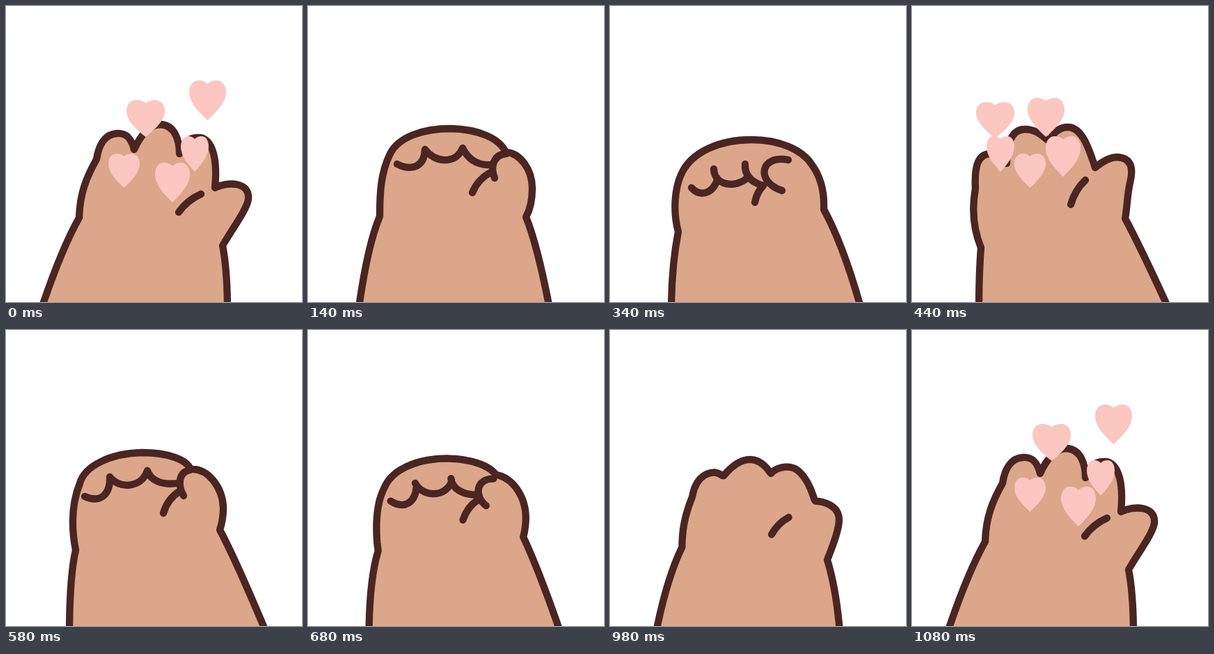
These frames come from a looping animation (425x425 px, 1180 ms). An HTML page:

```html
<!DOCTYPE html>
<html lang="en">
<head>
<meta charset="utf-8">
<title>Waving paw</title>
<style>
  html, body { margin: 0; width: 100%; height: 100%; overflow: hidden; background: #fff; }
  svg { display: block; width: 100vw; height: 100vh; }
  .ink { stroke: #4a2522; stroke-width: 10.3; stroke-linecap: round; stroke-linejoin: round; }
</style>
</head>
<body>
<svg viewBox="0 0 425 425">
  <path id="paw" class="ink" fill="#dca68a"/>
  <path id="marks" class="ink" fill="none"/>
  <g id="hearts" fill="#fcc6c1"></g>
</svg>
<script>
const LOOP = 1180;
const SVG = 'http://www.w3.org/2000/svg';
const SAMPLES = 120;
const HEART = 'M50 8C44 3 36 0 26 0C9 0 0 13 0 30C0 55 26 80 50 100' +
              'C74 80 100 55 100 30C100 13 91 0 74 0C64 0 56 3 50 8Z';

// left: foot x, control point; hand: wrist to wrist; right: control point, foot x.
// The crease is always the last of the marks.
const openRight = {
  left: [49, 79, 350],
  hand: '105 304C106 268 116 245 130 220C133 200 142 184 159 183C173 182 180 190 184 206' +
        'C192 188 205 170 222 170C242 171 249 192 249 212C250 200 262 189 275 189' +
        'C292 187 305 210 300 261C318 252 350 252 348 277C346 292 326 318 311 344',
  right: [318, 380, 318],
  marks: ['M280 270Q260 279 248 296'],
  hearts: [[173, 135, 55, 53], [263, 107, 53, 57], [147, 212, 45, 49], [214, 225, 50, 57], [251, 187, 40, 51]]
};

const openLeft = {
  left: [96, 96, 385],
  hand: '99 347C88 320 86 290 91 262C89 225 97 213 112 212C124 212 132 216 136 226' +
        'C136 200 142 177 162 177C180 177 188 188 197 194C204 179 213 174 224 174' +
        'C245 174 255 208 263 232C275 222 285 217 295 217C313 218 319 230 313 254' +
        'C309 270 309 290 306 305',
  right: [330, 350, 371],
  marks: ['M249 250Q234 264 228 285'],
  hearts: [[92, 138, 55, 52], [166, 132, 53, 56], [147, 212, 45, 49], [192, 187, 50, 58], [107, 187, 40, 51]]
};

const fistRight = {
  left: [72, 85, 345],
  hand: '103 302C103 270 104 240 118 212C130 188 165 176 205 176C245 177 275 190 284 210' +
        'C305 211 322 235 322 262C322 280 319 292 313 303',
  right: [330, 345, 348],
  marks: ['M128 227C150 238 167 230 168 206', 'M168 206C182 225 212 228 222 204',
          'M222 204C230 220 243 229 262 228', 'M285 212C267 213 261 230 268 247',
          'M264 238Q244 248 236 268']
};

const fistLeft = {
  left: [91, 91, 355],
  hand: '100 316C94 285 94 250 106 220C113 195 150 177 195 176C235 176 260 187 265 200' +
        'C290 198 311 226 312 255C312 268 310 278 307 287',
  right: [330, 330, 376],
  marks: ['M113 239C136 249 150 236 149 211', 'M149 211C162 228 194 228 203 202',
          'M203 202C208 217 225 223 247 220', 'M264 201C248 204 246 222 255 238',
          'M250 231Q232 242 226 263']
};

const tuckLeft = {
  left: [88, 88, 375],
  hand: '98 324C90 295 93 262 102 242C117 208 160 192 203 192C243 192 276 206 290 228' +
        'C303 246 308 268 307 292',
  right: [336, 345, 362],
  marks: ['M117 261C130 275 147 269 154 250', 'M149 234C150 258 180 262 197 247',
          'M194 227C193 246 206 254 220 258', 'M256 221C216 213 208 252 247 265',
          'M220 258Q211 267 208 282']
};

const tuckRight = {
  left: [81, 82, 368],
  hand: '102 319C101 295 103 270 108 252C120 218 158 200 200 200C240 200 280 215 299 243' +
        'C312 262 317 285 313 316',
  right: [333, 368, 343],
  marks: ['M129 258C142 274 161 272 168 252', 'M163 236C166 260 200 268 212 248',
          'M210 234C205 250 220 262 234 268', 'M271 237C232 230 220 265 257 279',
          'M233 268Q222 276 216 291']
};

const lerp = (a, b, k) => a + (b - a) * k;
const mixList = (a, b, k) => a.map((v, i) => lerp(v, b[i], k));

function mixPath(a, b, k) {
  const other = b.match(/\d+/g);
  let i = 0;
  return a.replace(/\d+/g, n => lerp(+n, +other[i++], k).toFixed(1));
}

function sample(hand) {
  const path = document.createElementNS(SVG, 'path');
  path.setAttribute('d', 'M' + hand);
  const length = path.getTotalLength();
  return Array.from({ length: SAMPLES + 1 }, (_, i) => {
    const p = path.getPointAtLength(length * i / SAMPLES);
    return [p.x, p.y];
  });
}

function mix(a, b, k) {
  const to = sample(b.hand);
  const points = sample(a.hand).map((p, i) => mixList(p, to[i], k).map(v => v.toFixed(1)).join(' '));
  const count = Math.min(a.marks.length, b.marks.length);
  const marksB = b.marks.slice(-count);
  return {
    left: mixList(a.left, b.left, k),
    hand: points.join('L'),
    right: mixList(a.right, b.right, k),
    marks: a.marks.slice(-count).map((m, i) => mixPath(m, marksB[i], k))
  };
}

// A closing paw lets its hearts drift up for a moment.
function closing(open, fist) {
  const hearts = open.hearts.map(([x, y, w, h]) => [x, y - 8, w, h]);
  return { ...mix(open, fist, 0.5), hearts };
}

const steps = [
  [0, openRight],
  [100, closing(openRight, fistRight)],
  [140, fistRight],
  [240, mix(fistRight, tuckLeft, 0.35)],
  [280, mix(fistRight, tuckLeft, 0.6)],
  [300, mix(fistRight, tuckLeft, 0.8)],
  [340, tuckLeft],
  [440, openLeft],
  [540, closing(openLeft, fistLeft)],
  [580, fistLeft],
  [680, mix(fistLeft, tuckRight, 0.35)],
  [780, mix(fistLeft, tuckRight, 0.7)],
  [880, tuckRight],
  [980, mix(tuckRight, openRight, 0.5)],
  [1080, openRight]
];

const paw = document.getElementById('paw');
const marks = document.getElementById('marks');
const heartLayer = document.getElementById('hearts');

function draw({ left, hand, right, marks: lines, hearts = [] }) {
  const [footL, lx, ly] = left;
  const [rx, ry, footR] = right;
  paw.setAttribute('d', `M${footL} 440Q${lx} ${ly} ${hand}Q${rx} ${ry} ${footR} 440Z`);
  marks.setAttribute('d', lines.join(''));
  heartLayer.replaceChildren(...hearts.map(([x, y, w, h]) => {
    const heart = document.createElementNS(SVG, 'path');
    heart.setAttribute('d', HEART);
    heart.setAttribute('transform', `translate(${x} ${y}) scale(${w / 100} ${h / 100})`);
    return heart;
  }));
}

const start = performance.now();
let shown = null;

function tick() {
  const time = (performance.now() - start) % LOOP;
  const pose = steps.filter(([at]) => at <= time).pop()[1];
  if (pose !== shown) draw(shown = pose);
  requestAnimationFrame(tick);
}
tick();
</script>
</body>
</html>
```
